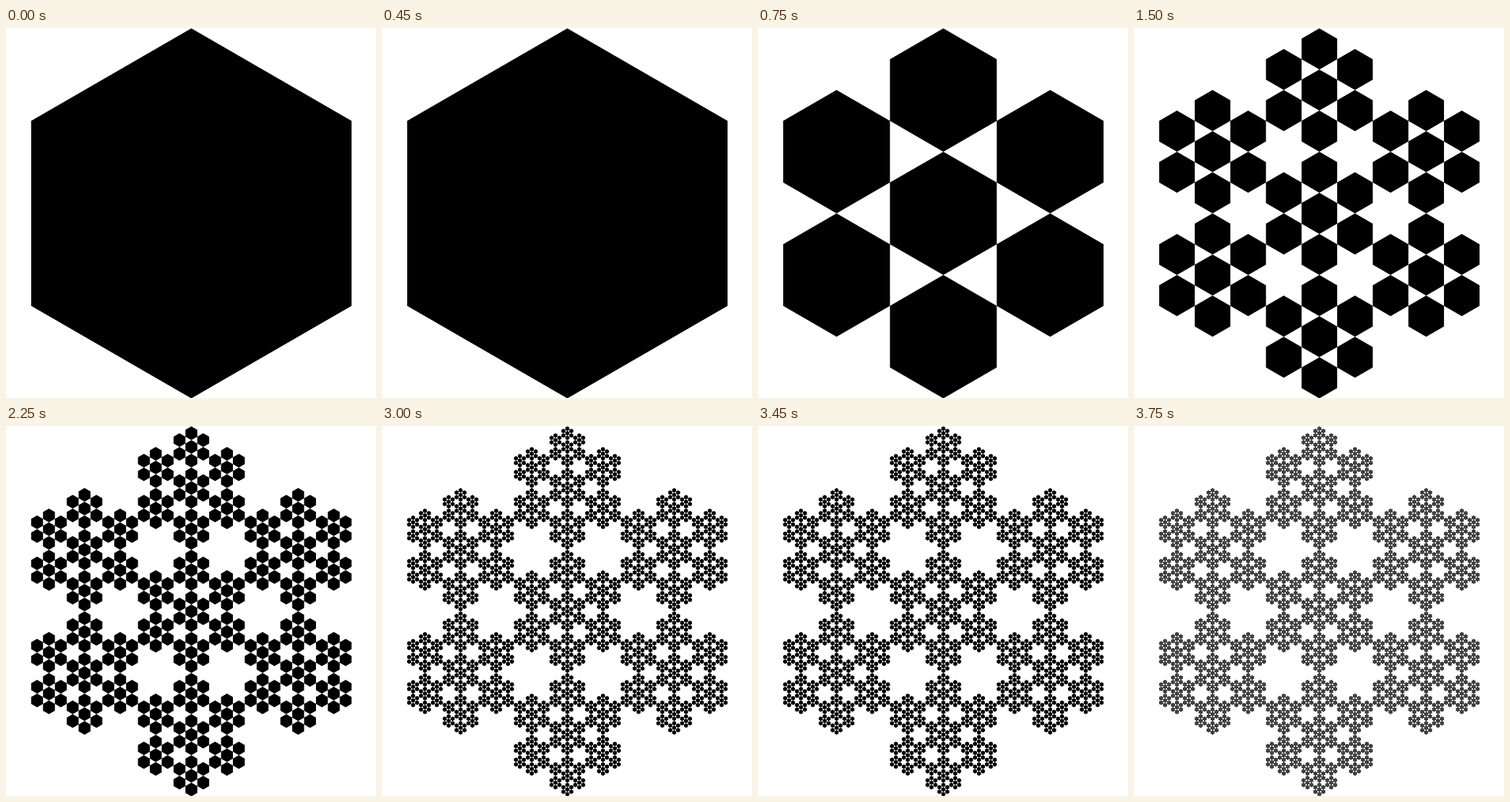
An HTML page that plays this animation: 512 px wide and 512 px high, repeating every 4500 ms.

```html
<!DOCTYPE html>
<html lang="en">
<head>
<meta charset="utf-8">
<title>Hexaflake</title>
<style>
  html, body { margin: 0; width: 100%; height: 100%; overflow: hidden; background: #fff; }
  svg { display: block; width: 100vw; height: 100vh; }
</style>
</head>
<body>
<svg viewBox="0 0 512 512"><path id="flake" fill="#000"/></svg>
<script>
const STEP = 750;
const LEVELS = 6;
const CENTER = 256.5;
const RADIUS = 256;

// Unit vectors to the six corners, starting at the top
const corners = Array.from({ length: 6 }, (_, i) => {
  const a = (i * 60 - 90) * Math.PI / 180;
  return [Math.cos(a), Math.sin(a)];
});

function hexagon(x, y, r) {
  const points = corners.map(([dx, dy]) =>
    (x + dx * r).toFixed(3) + ' ' + (y + dy * r).toFixed(3));
  return 'M' + points.join('L') + 'Z';
}

// Each hexagon becomes seven of a third the size: one in the middle, one per corner
function hexaflake(x, y, r, depth) {
  if (depth === 0) return hexagon(x, y, r);
  const small = r / 3;
  return [[0, 0], ...corners].map(([dx, dy]) =>
    hexaflake(x + dx * small * 2, y + dy * small * 2, small, depth - 1)).join('');
}

const shapes = Array.from({ length: LEVELS }, (_, depth) =>
  hexaflake(CENTER, CENTER, RADIUS, depth));
const flake = document.getElementById('flake');
let shown = -1;

function render(time) {
  const level = Math.floor(time / STEP) % LEVELS;
  if (level === shown) return;
  flake.setAttribute('d', shapes[level]);
  shown = level;
}

let start;
function tick(now) {
  start ??= now;
  render(Math.max(0, now - start));
  requestAnimationFrame(tick);
}

render(0);
requestAnimationFrame(tick);
</script>
</body>
</html>
```
